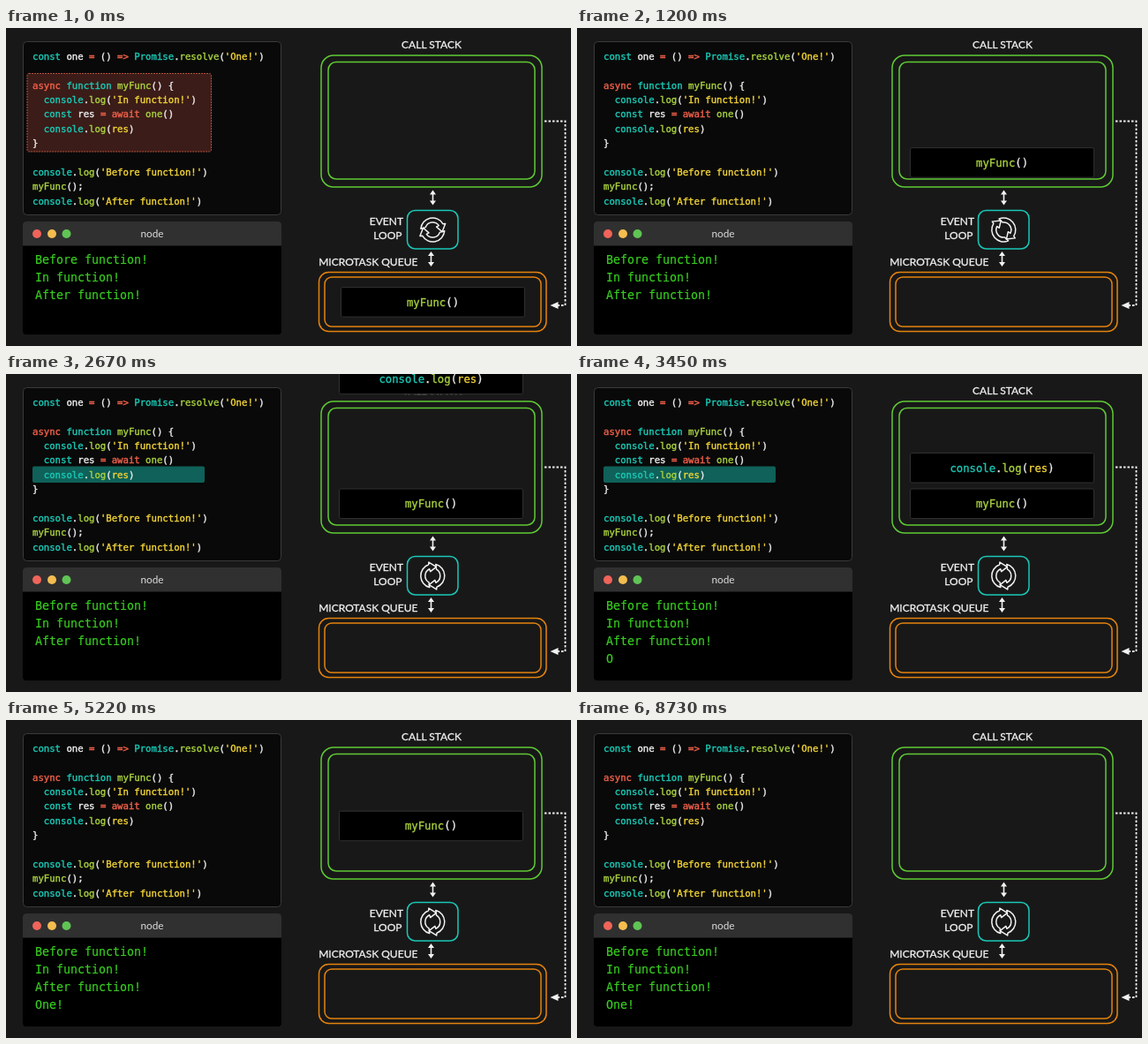
Recreate the animation shown at these times as an HTML page. Size 640 by 360 pixels, loop 8.76 s.

```html
<!DOCTYPE html>
<html lang="en">
<head>
<meta charset="utf-8">
<title>Event loop: resuming an async function</title>
<style>
  html, body { margin: 0; width: 100%; height: 100%; overflow: hidden; background: #181818; }
  svg { display: block; width: 100vw; height: 100vh; }
  text { white-space: pre; }
  .mono { font-family: "DejaVu Sans Mono", monospace; }
  .code { font-size: 10.65px; stroke-width: .4px; }
  .call { font-size: 12.25px; stroke-width: .35px; text-anchor: middle; }
  .out { font-size: 13.3px; fill: #38cc20; stroke: #38cc20; stroke-width: .2px; }
  .label { font: 12px Lato, sans-serif; fill: #f0f0f0; stroke: #f0f0f0; stroke-width: .3px; }
  .title { font-size: 11.8px; fill: #dcdcdc; stroke: none; }
  .mid { text-anchor: middle; }
  .end { text-anchor: end; }
  .line { fill: none; stroke-width: 1.5; }
  .w { fill: #eee; stroke: #eee; }
  .t { fill: #1ac8b5; stroke: #1ac8b5; }
  .g { fill: #a8d03f; stroke: #a8d03f; }
  .r { fill: #f0604a; stroke: #f0604a; }
  .y { fill: #f0d236; stroke: #f0d236; }
</style>
</head>
<body>
<svg viewBox="0 0 640 360">
  <rect width="640" height="360" fill="#181818"/>

  <rect x="19.5" y="15.5" width="292" height="196" rx="4" fill="#090909" stroke="#3a3a3a"/>
  <rect id="body" x="24" y="51.5" width="208.5" height="88.5" rx="2" fill="#3b1c18" stroke="#b8503f" stroke-dasharray="2 1"/>
  <rect id="active" x="30" y="104.5" width="195" height="18.5" rx="2" fill="#0f6159"/>
  <g id="code" class="mono code"></g>

  <rect x="19" y="219" width="293" height="128" rx="4"/>
  <path d="M19 246.500V223a4 4 0 0 1 4-4H308a4 4 0 0 1 4 4V246.500Z" fill="#303030"/>
  <circle cx="35" cy="233" r="5" fill="#f0645a"/>
  <circle cx="52" cy="233" r="5" fill="#f4bd4f"/>
  <circle cx="68.5" cy="233" r="5" fill="#60c455"/>
  <text class="label title mid" x="165.500" y="237">node</text>
  <g class="mono out">
    <text x="33" y="267">Before function!</text>
    <text x="33" y="287">In function!</text>
    <text x="33" y="307">After function!</text>
    <text x="33" y="327" id="typed"></text>
  </g>

  <text class="label mid" x="482" y="23">CALL STACK</text>
  <g class="line" stroke="#5fca34">
    <rect x="357" y="31" width="250" height="149" rx="14"/>
    <rect x="365" y="38.500" width="234" height="132.500" rx="9"/>
  </g>

  <text class="label end" x="450" y="222.500">EVENT</text>
  <text class="label end" x="448.500" y="238.500">LOOP</text>
  <rect class="line" x="454.500" y="206.500" width="57.500" height="43.500" rx="9" stroke="#1ac8b8"/>
  <g id="sync" class="line" stroke="#f2f2f2" stroke-linejoin="round"></g>

  <text class="label mid" x="410.300" y="269">MICROTASK QUEUE</text>
  <g class="line" stroke="#e4830e">
    <rect x="354.500" y="276.500" width="257.500" height="67" rx="11"/>
    <rect x="361" y="282" width="245" height="56" rx="8"/>
  </g>

  <g id="arrows" fill="#f2f2f2"></g>
  <path d="M610 105.500H633.500V314H625" fill="none" stroke="#f2f2f2" stroke-width="1.800" stroke-dasharray="2.500 2"/>
  <path d="M616.500 314l9-4v8Z" fill="#f2f2f2"/>

  <g id="cards" class="mono call"></g>
</svg>
<script>
const LOOP = 8760;
const $ = id => document.getElementById(id);
const clamp = x => Math.min(1, Math.max(0, x));
const ramp = (t, start, end) => clamp((t - start) / (end - start));
const ease = x => x * x * (3 - 2 * x);
const mix = (a, b, k) => a + (b - a) * k;

// Tokens are written as "class:text" separated by "|".
const spans = tokens => tokens.split("|")
  .map(s => `<tspan class="${s[0]}">${s.slice(2)}</tspan>`).join("");

const log = arg => `t:console|w:.|g:log|w:(|y:${arg}|w:)`;
const codeLines = [
  [0, "t:const|w: one |r:=|w: () |r:=&gt;|t: Promise|w:.|g:resolve|w:(|y:'One!'|w:)"],
  [2, "r:async|t: function|g: myFunc|w:() {"],
  [3, "w:  |" + log("'In function!'")],
  [4, "t:  const|w: res |r:= await|g: one|w:()"],
  [5, "w:  |" + log("res")],
  [6, "w:}"],
  [8, log("'Before function!'")],
  [9, "g:myFunc|w:();"],
  [10, log("'After function!'")]
];
$("code").innerHTML = codeLines.map(([row, tokens]) =>
  `<text x="30" y="${35.8 + row * 16.4}">${spans(tokens)}</text>`).join("");

const card = (id, tokens) => `<g id="${id}">
  <rect x=".5" y=".5" width="208" height="33.500" rx="2" stroke="#303030" stroke-width="1"/>
  <text x="104.500" y="21.500">${spans(tokens)}</text></g>`;
$("cards").innerHTML = card("func", "g:myFunc|w:()") + card("print", log("res"));

const doubleArrow = (x, y) =>
  `<path d="M${x} ${y}l3.500 5h-2.700v7h2.700l-3.500 5-3.500-5h2.700v-7h-2.700Z"/>`;
$("arrows").innerHTML = doubleArrow(483.5, 183.5) + doubleArrow(481.5, 253);

const polar = (r, deg) => {
  const a = deg * Math.PI / 180;
  return `${(r * Math.cos(a)).toFixed(2)} ${(r * Math.sin(a)).toFixed(2)}`;
};
const curvedArrow = `M${polar(13.5, -205)}A13.500 13.500 0 0 1 ${polar(13.5, -60)}` +
  `L${polar(16, -56)}L${polar(11, -18)}L${polar(5.5, -68)}L${polar(8.5, -65)}` +
  `A8.500 8.500 0 0 0 ${polar(8.5, -190)}Z`;
$("sync").innerHTML = [0, 180].map(a =>
  `<path d="${curvedArrow}" transform="rotate(${a})"/>`).join("");

const place = (id, x, y) => $(id).setAttribute("transform", `translate(${x} ${y})`);
const fade = (id, opacity) => $(id).setAttribute("opacity", opacity);

function draw(t) {
  const toStack = ease(ramp(t, 668, 1268));
  const funcOut = ease(ramp(t, 5070, 5670));
  place("func", mix(379, 377, toStack), mix(mix(293, 129.5, toStack), -40, funcOut));

  const printIn = ease(ramp(t, 2460, 3060));
  const printOut = ease(ramp(t, 4004, 4604));
  place("print", 377, mix(-51, 89, printIn - printOut));

  fade("body", 1 - ease(ramp(t, 600, 1200)));
  fade("active", ramp(t, 1440, 2040) - ramp(t, 4620, 5100));

  const typed = t < 3450 ? 0 : 1 + Math.floor((t - 3450) / 90);
  $("typed").textContent = "One!".slice(0, typed);

  const spin = mix(30, 310, ease(ramp(t, 210, 1500)));
  $("sync").setAttribute("transform", `translate(483.300 228.500) rotate(${spin})`);
}

const start = performance.now();
function tick() {
  draw((performance.now() - start) % LOOP);
  requestAnimationFrame(tick);
}
tick();
</script>
</body>
</html>
```
